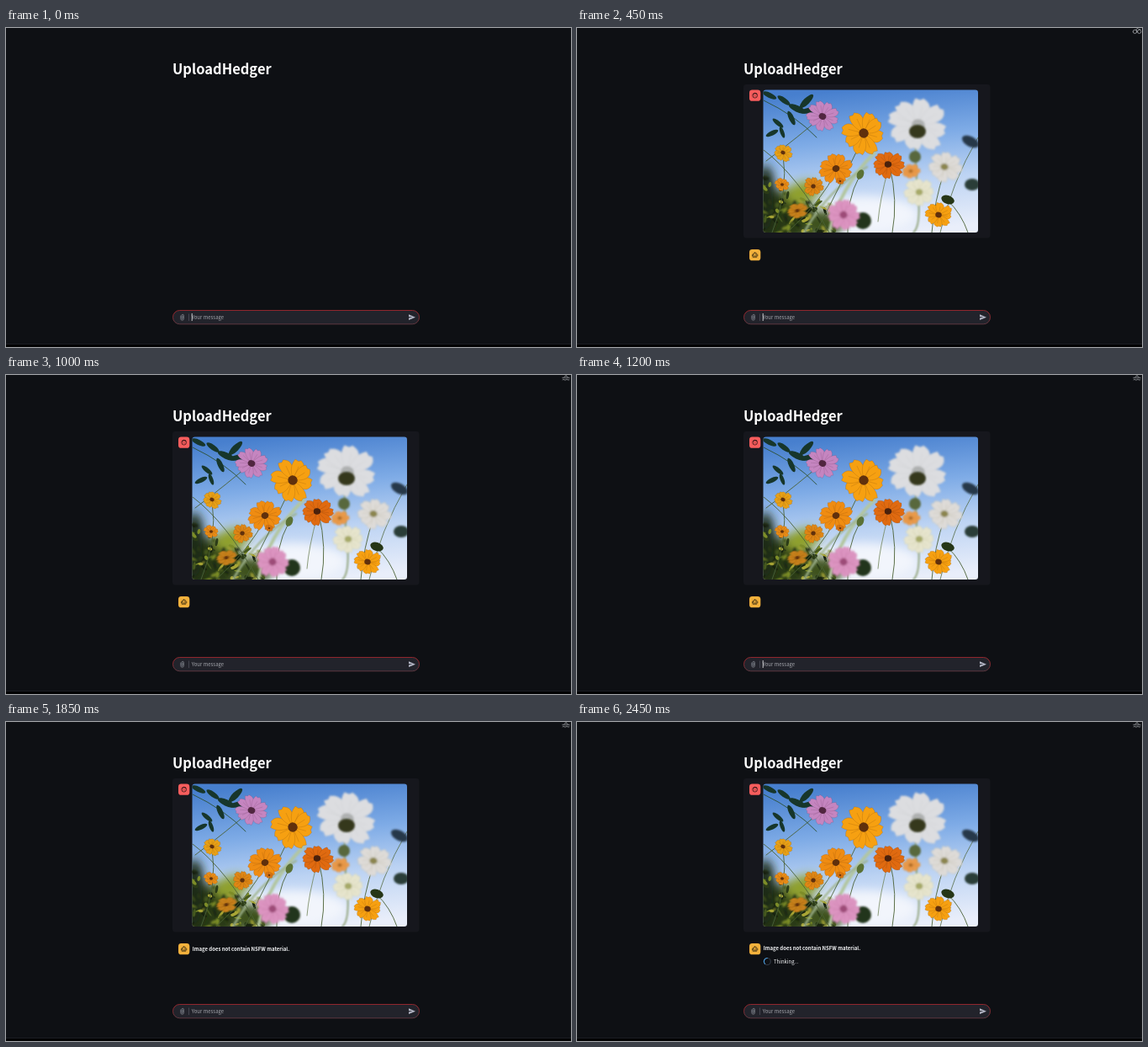
An HTML page that plays this animation: 672x379 px, repeating every 2500 ms.

```html
<!DOCTYPE html>
<html lang="en">
<head>
<meta charset="utf-8">
<style>
  html, body { margin: 0; height: 100%; overflow: hidden; background: #0e1014; }
  svg { display: block; width: 672px; height: 379px; }
  text { font: 6px "Noto Sans CJK SC", "Noto Sans CJK JP", "Noto Sans CJK", "Open Sans", sans-serif; fill: #f4f5f7; }
  .bold { font-weight: 700; }
  .title { font-size: 16.5px; font-weight: 700; fill: #fff; }
  .line { fill: none; stroke-linecap: round; }
</style>
</head>
<body>
<svg viewBox="0 0 672 379">
  <defs>
    <linearGradient id="sky" x1=".4" y1="0" x2=".55" y2="1">
      <stop offset="0" stop-color="#477fce"/>
      <stop offset=".35" stop-color="#7eabe6"/>
      <stop offset=".65" stop-color="#bcd3f3"/>
      <stop offset="1" stop-color="#e9eefa"/>
    </linearGradient>
    <linearGradient id="rim" x1="0" y1="0" x2="0" y2="1">
      <stop offset=".3" stop-color="#b02a31"/>
      <stop offset="1" stop-color="#6d3f48"/>
    </linearGradient>
    <clipPath id="frame"><rect x="221.5" y="73.5" width="255.5" height="169.5" rx="3.3"/></clipPath>
    <filter id="soft" x="-30%" y="-30%" width="160%" height="160%"><feGaussianBlur stdDeviation="1"/></filter>
    <filter id="haze" x="-50%" y="-50%" width="200%" height="200%"><feGaussianBlur stdDeviation="6"/></filter>
  </defs>
  <rect width="672" height="379" fill="#0e1014"/>
  <rect y="375" width="672" height="1" fill="#1b1d23"/>
  <rect y="376" width="672" height="3" fill="#020203"/>
  <text class="title" x="198" y="55">UploadHedger</text>

  <g id="chat">
    <rect x="198" y="67" width="293.5" height="182.5" rx="3.4" fill="#16171d"/>
    <g transform="translate(205 73.5)">
      <rect width="13.3" height="13.3" rx="3.4" fill="#f75d5d"/>
      <circle cx="6.65" cy="6.65" r="2.9" fill="none" stroke="#3a1719" stroke-width=".8"/>
      <path d="M3.9 6Q6 5.8 6.7 4.2Q7.6 5.6 9.4 5.6L8.6 4L6.5 3.4Z" fill="#3a1719"/>
      <path d="M5.5 7.3h.1M7.7 7.3h.1" class="line" stroke="#3a1719" stroke-width=".8"/>
    </g>
    <g clip-path="url(#frame)" id="photo"><rect x="221" y="73" width="257" height="171" fill="url(#sky)"/></g>
    <g transform="translate(205 263)">
      <rect width="13.3" height="13.3" rx="3.4" fill="#f3b13c"/>
      <path d="M4.4 5.5Q4.4 4.5 5.4 4.5H7.9Q8.9 4.500 8.9 5.500V9.200H4.400ZM6.650 4.300V3.600M3.500 6.600v.8M9.800 6.600v.8M5.700 8.200h1.900" class="line" stroke="#33270f" stroke-width=".8"/>
      <path d="M5.700 6.400h.1M7.600 6.400h.1" class="line" stroke="#33270f" stroke-width=".9"/>
    </g>
    <text id="answer" class="bold" x="221.7">Image does not contain NSFW material.</text>
    <g id="thinking">
      <circle cx="226.3" cy="284.5" r="4" class="line" stroke="#343a45" stroke-width="1.1"/>
      <path id="arc" d="M223.5 287.3A4 4 0 0 1 226.3 280.5" class="line" stroke="#4ba3e8" stroke-width="1.1"/>
      <text x="234" y="286.8" style="font-weight:500">Thinking...</text>
    </g>
    <g class="line" stroke="#b4b6ba" stroke-width=".7">
      <path id="B" d="M661.3 4.3a2.2 2.2 0 1 0 4.4 0a2.2 2.2 0 1 0 -4.4 0M666.5 4.3a2.2 2.2 0 1 0 4.4 0a2.2 2.2 0 1 0 -4.4 0M666 5V3.2L664.7 1.8L667 .2L668.3 1.6H670"/>
      <path id="W" d="M665.3 0V3H668L669.3 6H670.4M664.3 2.4a2.2 2.2 0 1 0 3.1 2.8M665.5 1.3h2.3"/>
      <path id="S" d="M661.8 3.3H670.2M662 5.6q1-1 2 0t2 0t2 0t2 0M664 2.2L666 .9L668.2 2.4M666 .1h.3"/>
    </g>
  </g>

  <rect x="198.5" y="335.5" width="293" height="16.3" rx="8.1" fill="#22232b" stroke="url(#rim)" stroke-width=".8"/>
  <path d="M207.8 342v3.4a1.8 1.8 0 0 0 3.6 0V341.5a1.2 1.2 0 0 0-2.4 0v3.5a.6.6 0 0 0 1.2 0V342" class="line" stroke="#8f929b" stroke-width=".7"/>
  <path d="M217.5 339.5v8.5" stroke="#53555f" stroke-width=".7"/>
  <text x="220.8" y="345.5" style="fill:#a3a5ac">Your message</text>
  <path id="caret" d="M221.2 339v9" stroke="#f4f5f7" stroke-width=".8"/>
  <path d="M479 340.3L487 343.7L479 347.1V344.5L483.5 343.7L479 342.9Z" fill="#b4b7c6"/>
</svg>
<script>
const LOOP = 2500;
const $ = id => document.getElementById(id);
const photo = $('photo');

let seed = 7;
const random = (min, max) => {
  seed = seed * 16807 % 2147483647;
  return min + (max - min) * seed / 2147483647;
};
function add(name, attrs, parent = photo) {
  const el = document.createElementNS('http://www.w3.org/2000/svg', name);
  for (const key in attrs) el.setAttribute(key, attrs[key]);
  parent.append(el);
  return el;
}
const filterOf = name => name ? { filter: `url(#${name})` } : {};

function blob(x, y, rx, ry, fill, angle = 0, filter = 'soft') {
  add('ellipse', { cx: x, cy: y, rx, ry, fill, transform: `rotate(${angle} ${x} ${y})`, ...filterOf(filter) });
}
function stem(d, stroke = '#4b6136', width = .9, filter = '') {
  add('path', { d, stroke, 'stroke-width': width, class: 'line', ...filterOf(filter) });
}
// Broad petals with blunt, notched tips and a darker middle vein
function flower(x, y, r, fill, core, petals = 8, squash = 1, tilt = 0, filter = '') {
  const group = add('g', { transform: `translate(${x} ${y}) rotate(${tilt}) scale(1 ${squash})`, ...filterOf(filter) });
  for (let i = 0; i < petals; i++) {
    const len = r * random(.88, 1.08), w = r * 2.7 / petals;
    add('path', {
      d: `M0 0C${len * .3} ${-w * .6} ${len * .6} ${-w * 1.2} ${len * .95} ${-w * .8}L${len * .92} ${-w * .3}L${len} 0`
        + `L${len * .92} ${w * .4}C${len * .7} ${w * 1.2} ${len * .3} ${w * .6} 0 0M0 0H${len * .7}`,
      fill, stroke: core, 'stroke-opacity': .3, 'stroke-width': .5,
      transform: `rotate(${i * 360 / petals + random(-6, 6)})`
    }, group);
  }
  add('circle', { r: r * .22, fill: core }, group);
}

// Hazy background
blob(340, 222, 65, 22, '#f2f5fc', 0, 'haze');
blob(238, 226, 46, 32, '#2c3b17', 0, 'haze');
blob(292, 233, 24, 16, '#3d511e', 0, 'haze');
blob(224, 205, 13, 42, '#1d2912', 0, 'haze');
blob(268, 196, 22, 13, '#8fa02c', -20, 'haze');

// Undergrowth
const GREENS = ['#18230f', '#2b3b17', '#46591f', '#7d8d28', '#a8a535'];
for (let i = 0; i < 90; i++) {
  const x = 222 + 88 * random(0, 1) ** 1.4;
  blob(x, random(178 + (x - 222) * .4, 245), random(2, 6), random(.8, 2.4), GREENS[i % 5], random(0, 180), i % 2 ? 'soft' : '');
}

// Stems
stem('M300 243Q312 190 354 148', '#b2c6a0', 4, 'soft');
stem('M270 243Q300 190 345 165', '#9fb38c', 2.5, 'soft');
stem('M225 158Q265 128 290 106');
stem('M222 145Q262 175 300 243');
stem('M341 128Q327 160 284 243');
stem('M372 165Q382 205 375 243');
stem('M370 168Q360 205 358 230', '#71845a', .8);
stem('M308 170Q292 205 250 243');
stem('M406 118Q400 145 405 190T400 243', '#7f9461', 1.6, 'soft');
stem('M437 170Q425 205 422 243');
stem('M477 130Q445 185 432 243', '#556b43', .8);
stem('M222 86Q260 104 285 130', '#2d5134');
stem('M336 176Q320 205 322 243');
stem('M245 150Q252 195 232 243');
stem('M465 243Q457 220 441 205');

// Leaves and buds
for (const [x, y, size, angle] of [[262, 96, 11, 25], [273, 87, 11, -45], [246, 86, 9, 35], [276, 98, 10, -10],
  [255, 107, 9, 65], [239, 113, 8, 40], [232, 125, 8, -25], [244, 124, 7, 70], [229, 80, 9, 25]])
  blob(x, y, size, size * .34, '#17362b', angle, '');
blob(468, 135, 11, 6, '#26384a', 28);
blob(470, 186, 9, 7, '#293d37');
blob(340, 229, 10, 10, '#24351b');
blob(402, 153, 7, 7, '#59683d');
blob(441, 204, 8, 5, '#263617', 20, '');
blob(337, 174, 4, 6, '#5a7135', 25, '');

// Blossoms
const ORANGE = '#f6a011', BROWN = '#60300c', WHITE = '#dcdde0';
flower(406, 115, 36, WHITE, '#aeb0b0', 8, .86, 14, 'soft');
blob(405, 123, 10, 8, '#35371f');
flower(437, 165, 21, '#dedbd8', '#8b854f', 8, .85, 8, 'soft');
flower(407, 195, 19, '#e6e4cd', '#a6a967', 8, .9, 0, 'soft');
flower(397, 170, 11, '#eb9b4b', '#ae6a24', 7, .8, 0, 'soft');
flower(317, 222, 21, '#dc94c1', '#9d4c78', 9, .95, 10, 'soft');
flower(292, 105, 20, '#c585c0', '#512640', 9, .85, 24);
flower(341, 125, 26, ORANGE, BROWN, 8, .98, 18);
flower(308, 167, 20, '#ef8c12', BROWN, 8, .9, -16);
flower(370, 162, 19, '#e06a10', '#4a210c', 8, .88, 5);
flower(430, 222, 17, ORANGE, BROWN, 8, .9, 10);
flower(245, 148, 12, '#e7a017', BROWN, 7, .85, 20);
flower(244, 186, 9, '#e98c17', BROWN, 7, .85);
flower(281, 188, 12, '#df8715', BROWN, 8, .95, 15);
flower(262, 217, 13, '#c7811b', BROWN, 7, .7, -15, 'soft');
flower(313, 182, 5, '#df7812', BROWN, 6, .8);

const show = (id, on) => $(id).style.display = on ? '' : 'none';
const within = (t, from, to) => t >= from && t < to;
const ICONS = 'BBBWWSSSBSWBS';

function draw(now) {
  const t = now % LOOP;
  const thinking = t >= 2200;
  show('chat', t >= 50);
  show('answer', t >= 1700);
  $('answer').setAttribute('y', thinking ? 270.5 : 272.3);
  show('thinking', thinking);
  $('arc').setAttribute('transform', `rotate(${(t - 2450) * .36} 226.3 284.5)`);
  show('caret', t < 650 || within(t, 1150, 1650) || within(t, 2150, 2400));
  for (const icon of 'BWS') show(icon, ICONS[Math.floor(t / 200)] === icon);
}
const start = performance.now();
function tick() {
  draw(performance.now() - start);
  requestAnimationFrame(tick);
}
tick();
</script>
</body>
</html>
```
